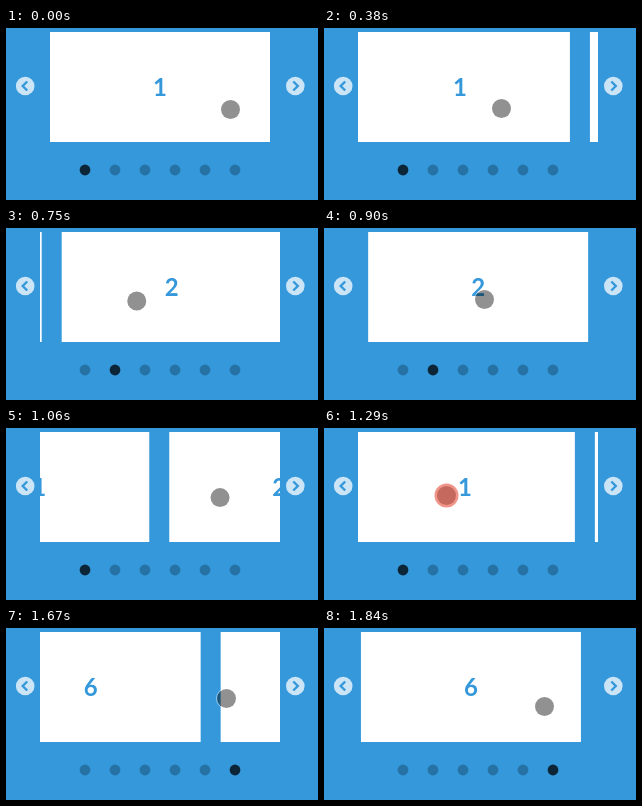
An HTML page that plays this animation: 312 px wide and 172 px high, repeating every 1.91 s.

```html
<!DOCTYPE html>
<html lang="en">
<head>
<meta charset="utf-8">
<title>Carousel</title>
<style>
  html, body { margin: 0; width: 100%; height: 100%; overflow: hidden; background: #3498db; }
  svg { display: block; width: 312px; height: 172px; }
  text { font: bold 24px Lato, sans-serif; fill: #3498db; text-anchor: middle; }
  .chevron { fill: none; stroke: #3498db; stroke-width: 2.4; }
</style>
</head>
<body>
<svg viewBox="0 0 312 172">
  <clipPath id="view"><rect x="34" width="240" height="172"/></clipPath>
  <g clip-path="url(#view)"><g id="track"></g></g>
  <g id="dots"></g>
  <g id="arrow" transform="translate(19.2 58)">
    <circle r="9.3" fill="#fff" fill-opacity=".75"/>
    <path class="chevron" d="M2 -4.5L-2.5 0L2 4.5"/>
  </g>
  <use href="#arrow" transform="translate(308.5 0) scale(-1 1)"/>
  <g id="cursor">
    <circle r="10" fill="none" stroke="#fff" stroke-opacity=".5"/>
    <circle r="9.5" fill-opacity=".43"/>
    <circle id="press" r="12" fill="#e74c3c" fill-opacity=".6"/>
  </g>
</svg>
<script>
const LOOP = 1910, PITCH = 240, SLIDES = 6, GLIDE = 500;
const RUN = 428, STEP = 78, PRESS = 1290;
const $ = id => document.getElementById(id);

// Key points of the cursor path: time, x, y
const path = [
  [0, 224.5, 81.5], [210, 224.5, 80.5], [380, 177.5, 80.5], [RUN, 92, 79],
  [584, 101, 74.5], [896, 160.5, 71.5], [974, 231, 70],
  [1286, 122.5, 67.5], [1520, 220.5, 69.5], [LOOP, 220.5, 79.5]
];

// Each swipe drags the track, then lets it glide to a slide.
const swipes = [
  { start: 353, from: 0, release: 419, drop: 108, slide: 1 },
  { start: 901, from: 240, release: 956, drop: 167, slide: 0 },
  { start: PRESS, from: 13, release: 1493, drop: -138.3, slide: -1 }
];

const mix = (a, b, u) => a + (b - a) * u;
const smooth = u => u * u * (3 - 2 * u);
const wrap = i => (i + SLIDES) % SLIDES;

// The picture holds still between steps: slow at first, then regular.
const hold = t => t < RUN
  ? [0, 210, 380].findLast(s => t >= s)
  : t - (t - RUN) % STEP;

// CSS "ease": cubic-bezier(.25, .1, .25, 1)
function ease(x) {
  if (x >= 1) return 1;
  let lo = 0, hi = 1, s;
  for (let i = 0; i < 20; i++) {
    s = (lo + hi) / 2;
    if (.75 * s * (1 - s) + s ** 3 < x) lo = s; else hi = s;
  }
  return .3 * s * (1 - s) ** 2 + 3 * s * s * (1 - s) + s ** 3;
}

function cursorAt(t) {
  const i = path.findIndex(key => t < key[0]);
  const [t0, x0, y0] = path[i - 1], [t1, x1, y1] = path[i];
  const u = smooth((t - t0) / (t1 - t0));
  return [mix(x0, x1, u), mix(y0, y1, u)];
}

function scrollAt(t) {
  const swipe = swipes.findLast(s => t >= s.start);
  if (!swipe) return 0;
  const { start, from, release, drop, slide } = swipe;
  return t < release
    ? mix(from, drop, ((t - start) / (release - start)) ** 2)
    : mix(drop, slide * PITCH, ease((t - release) / GLIDE));
}

const slideAt = t => swipes.findLast(s => t >= s.release)?.slide ?? 0;

$("track").innerHTML = [-1, 0, 1].map(i => `
  <g transform="translate(${i * PITCH})">
    <rect x="44" y="4" width="220" height="110" fill="#fff"/>
    <text x="154" y="68">${wrap(i) + 1}</text>
  </g>`).join("");
for (let i = 0; i < SLIDES; i++)
  $("dots").innerHTML += `<circle cx="${79 + 30 * i}" cy="142" r="5.4"/>`;

function draw(now) {
  const t = hold(now % LOOP);
  const active = wrap(slideAt(t));
  $("track").setAttribute("transform", `translate(${-scrollAt(t)})`);
  [...$("dots").children].forEach((dot, i) =>
    dot.setAttribute("fill-opacity", i === active ? .75 : .25));
  $("cursor").setAttribute("transform", `translate(${cursorAt(t)})`);
  $("press").setAttribute("visibility",
    Math.abs(t - PRESS) < STEP / 2 ? "visible" : "hidden");
}

const begin = performance.now();
function tick() {
  draw(performance.now() - begin);
  requestAnimationFrame(tick);
}
tick();
</script>
</body>
</html>
```
